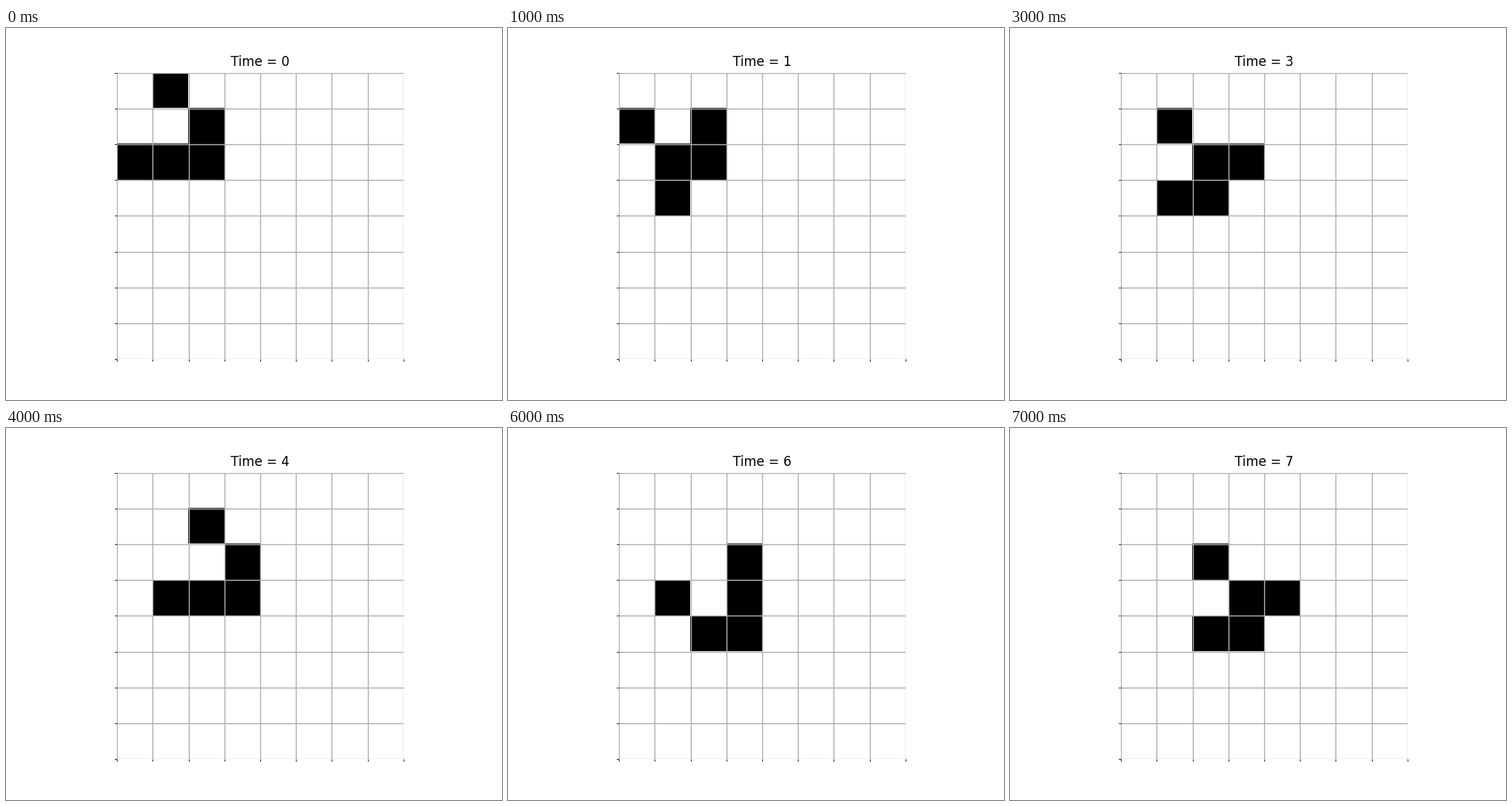
A matplotlib script that plays this animation: 640 px wide and 480 px high, repeating every 8 s.

```python
import numpy as np
import matplotlib.pyplot as plt
from matplotlib.animation import FuncAnimation

SIZE = 8
STEPS = 8


def step(cells):
    """Advance Conway's Game of Life by one generation on a torus."""
    shifts = [(r, c) for r in (-1, 0, 1) for c in (-1, 0, 1) if (r, c) != (0, 0)]
    near = sum(np.roll(cells, s, axis=(0, 1)) for s in shifts)
    return ((near == 3) | ((cells == 1) & (near == 2))).astype(int)


glider = np.zeros((SIZE, SIZE), dtype=int)
glider[[0, 1, 2, 2, 2], [1, 2, 0, 1, 2]] = 1
history = [glider]
for _ in range(STEPS - 1):
    history.append(step(history[-1]))

fig, ax = plt.subplots(figsize=(6.4, 4.8), dpi=100)
board = ax.imshow(glider, cmap="binary", vmin=0, vmax=1)
title = ax.set_title("Time = 0")

edges = np.arange(SIZE + 1) - 0.5
ax.set_xticks([])
ax.set_yticks([])
ax.set_xticks(edges, minor=True)
ax.set_yticks(edges, minor=True)
ax.grid(which="minor", color="#b0b0b0", linewidth=1)
ax.spines[:].set_visible(False)


def update(t):
    board.set_data(history[t])
    title.set_text(f"Time = {t}")
    return board, title


anim = FuncAnimation(fig, update, frames=STEPS, interval=1000,
                     repeat=True, repeat_delay=0)
plt.show()
```
